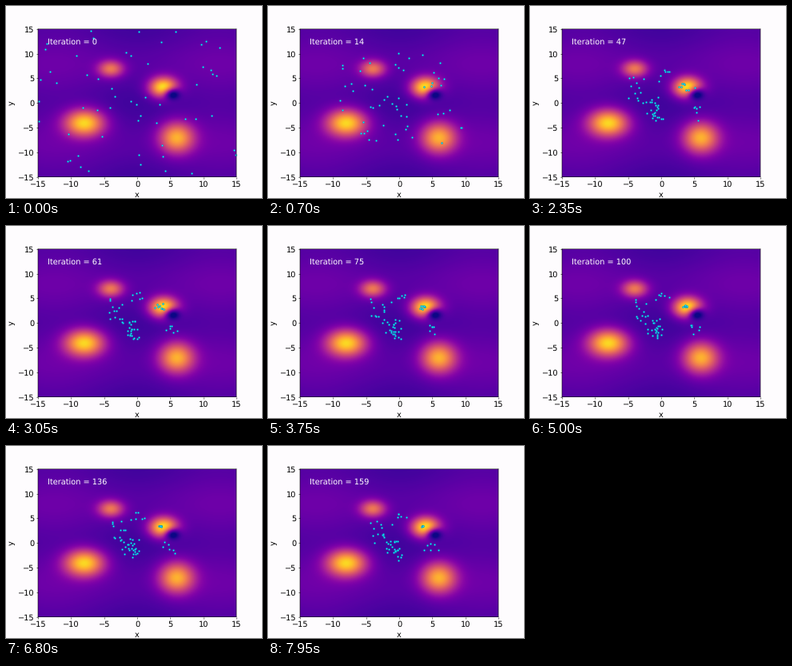
Animation of 320x240 px, one loop 8000 ms. Source, as a matplotlib script:

```python
import numpy as np
import matplotlib.pyplot as plt
from matplotlib.animation import FuncAnimation

FRAMES = 160
COUNT = 56
LIM = 15
PEAK = (3.5, 3.4)
RESTS = [(4.8, -1), (-1, -1.9), (-0.9, -0.2), (-2.8, 1.6), (-3.2, 3.9), (0, 4.9)]

plt.rcParams.update({"font.size": 14, "font.family": "DejaVu Sans",
                     "text.hinting": "none", "path.snap": False})


def bump(x, y, cx, cy, sx, sy):
    return np.exp(-((x - cx) / sx) ** 2 / 2 - ((y - cy) / sy) ** 2 / 2)


def landscape(x, y):
    base = 0.155 - 0.025 * np.cos(np.pi * x / 12.5) - 0.03 * np.cos(np.pi * y / 8)
    return (base
            + 0.76 * bump(x, y, -8, -4, 2.1, 1.9)
            + 0.65 * bump(x, y, 6, -7, 1.85, 2.2)
            + 0.50 * bump(x, y, -4, 7, 1.35, 1.2)
            + 0.85 * bump(x, y, 4, 3.2, 1.5, 1.45)
            - 0.53 * bump(x, y, 5.2, 2, 0.85, 0.85))


rng = np.random.default_rng(7)

# Scattered start, a little denser towards the top
u, v = rng.random((2, COUNT))
start = np.column_stack([-LIM + 2 * LIM * u, LIM - 2 * LIM * v ** 1.2])

# Each agent settles near the resting place closest to its own direction
anchors = np.array([PEAK] + RESTS)
gap = np.linalg.norm(start[:, None] / 3 - anchors, axis=2)
nearest = gap.argmin(axis=1)
at_peak = nearest == 0
home = anchors[nearest] + np.where(
    at_peak[:, None], 0, rng.uniform(-0.9, 0.9, (COUNT, 2)))
tau = np.where(at_peak, 13, 19)

# Correlated random walk around the drift path
noise = rng.normal(size=(FRAMES, COUNT, 2))
for k in range(1, FRAMES):
    noise[k] = 0.75 * noise[k - 1] + 0.66 * noise[k]


def positions(k):
    pull = np.exp(-k / tau)[:, None]
    amp = np.where(at_peak, 2.2 * np.exp(-k / 40), 0.35) * (1 - np.exp(-k / 12))
    return home + (start - home) * pull + noise[k] * amp[:, None]


fig, ax = plt.subplots(figsize=(6.4, 4.8), dpi=50, facecolor="#fefcfe")
grid = np.linspace(-LIM, LIM, 300)
ax.imshow(landscape(*np.meshgrid(grid, grid)), extent=(-LIM, LIM, -LIM, LIM),
          origin="lower", cmap="plasma", vmin=0, vmax=1, aspect="auto",
          interpolation="bilinear")
ticks = range(-LIM, LIM + 1, 5)
ax.set(xlim=(-LIM, LIM), ylim=(-LIM, LIM), xlabel="x", ylabel="y",
       xticks=ticks, yticks=ticks)
dots, = ax.plot([], [], "o", mfc="cyan", mec="tab:blue", ms=3, mew=0.7)
label = ax.text(-13.5, 11.9, "", color="white")


def update(k):
    dots.set_data(*positions(k).T)
    label.set_text(f"Iteration = {k}")
    return dots, label


anim = FuncAnimation(fig, update, frames=FRAMES, interval=50, repeat=True,
                     repeat_delay=0)
plt.show()
```
